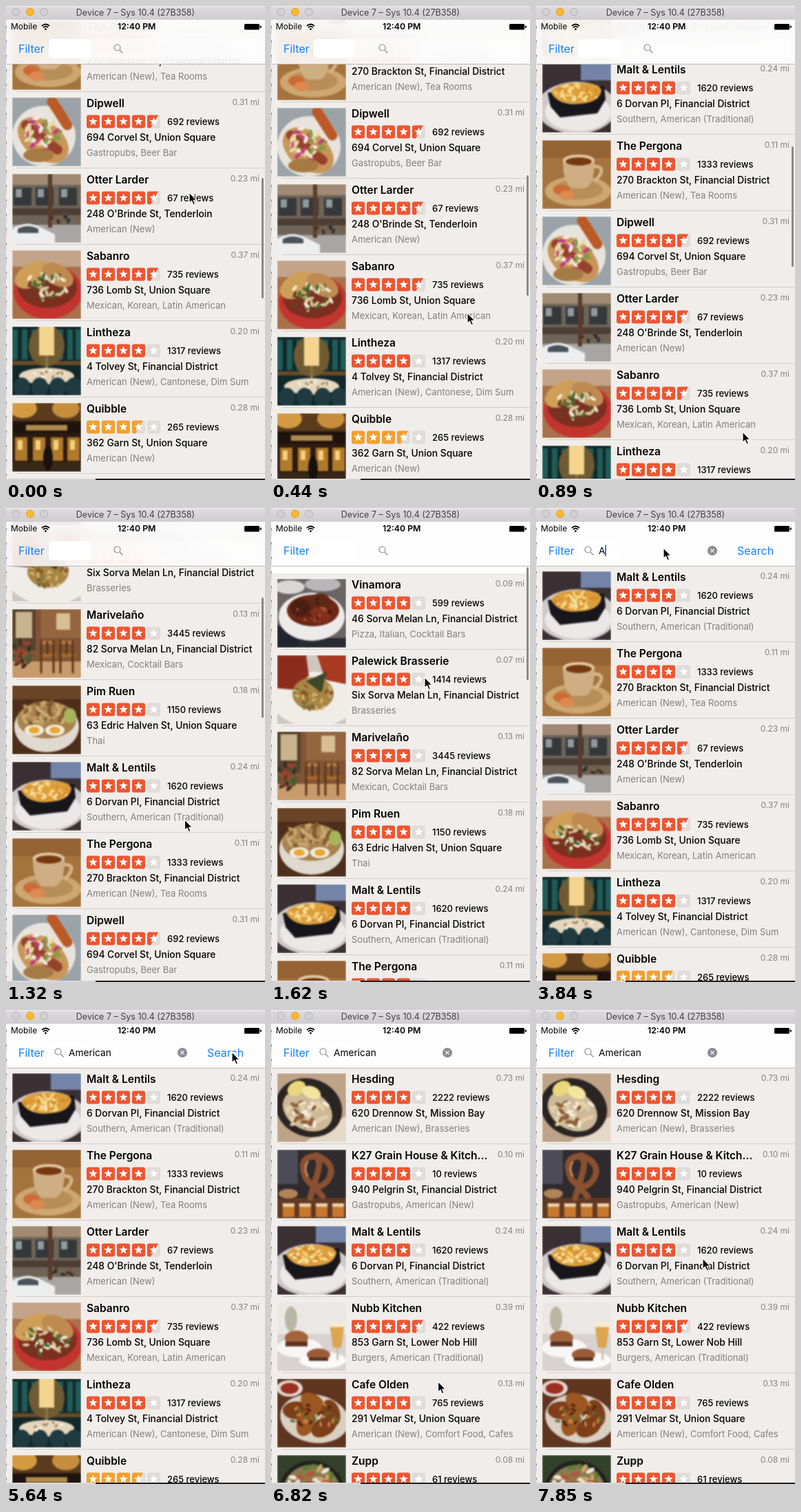
An HTML page that plays this animation: 376 by 689 pixels, repeating every 8 s.

```html
<!DOCTYPE html>
<html lang="en">
<head>
<meta charset="utf-8">
<title>Restaurant list</title>
<style>
html, body { margin: 0; width: 100%; height: 100%; overflow: hidden; }
body { position: relative; background: #d9d6da; font-family: Inter, "Noto Sans", sans-serif; color: #000; }
div, svg, b, span { position: absolute; white-space: nowrap; line-height: 20px; }
#bar { left: 0; top: 0; width: 376px; height: 20px; background: linear-gradient(#eeeaf0 1px, #dddadd 2px, #cfcdcf); }
#bar span { width: 376px; text-align: center; font-size: 12.5px; color: #404040; }
#bar svg, #cursor { left: 0; top: 0; }
#edge { left: 0; top: 20px; width: 1px; height: 669px; background: repeating-linear-gradient(#f2eff4 0 9px, #77747f 9px 12px, #d5d2da 12px 21px); }
#foot { left: 130px; top: 687px; width: 246px; height: 2px; background: #2b2026; }
#screen { left: 1px; top: 20px; width: 375px; height: 667px; overflow: hidden; background: #fff; }
.list { left: 0; top: 64px; width: 375px; background: #f0edea; }
.row { left: 0; width: 375px; height: 111px; }
.row::after { content: ""; position: absolute; left: 15px; right: 0; bottom: 0; height: 1px; background: #d0cdca; }
.thumb { left: 8px; top: 8px; width: 100px; height: 100px; overflow: hidden; }
.thumb svg { filter: blur(1px); }
.row > b, .row > span { left: 116px; }
.row > b { top: 7px; font-size: 15.5px; font-weight: 600; }
.row > .far { top: 5px; left: auto; right: 8px; font-size: 12px; color: #85827f; }
.row > svg { left: 116px; top: 33px; }
.row > .count { left: 233px; top: 33px; font-size: 13px; font-weight: 500; }
.row > .street { top: 56px; font-size: 13.8px; font-weight: 500; }
.row > .kind { top: 78px; font-size: 13px; color: #827f7c; }
#thumbBar { left: 370px; width: 3px; border-radius: 2px; background: #8b8886; }
#nav { left: 0; top: 0; width: 375px; height: 64px; background: rgba(253,253,253,.88); backdrop-filter: blur(14px); border-bottom: 1px solid #bab8b6; }
#field { left: 61px; top: 28px; width: 306px; height: 28px; border-radius: 5px; background: linear-gradient(90deg, #fff 60px, rgba(255,255,255,.35) 61px); }
#nav .link { top: 32px; font-size: 16px; color: #1482ff; }
#typed { left: 90px; top: 32px; font-size: 13.7px; }
#caret { top: 34px; width: 2px; height: 16px; background: #4070f2; }
</style>
</head>
<body>
<div id="screen">
  <div id="lists"></div>
  <div id="thumbBar"></div>
  <div id="nav">
    <span style="left:6px;font-size:12px">Mobile</span>
    <svg style="left:50px;top:5px" width="14" height="11" fill="none" stroke="#000" stroke-width="1.7">
      <path d="M1 4Q6.5-1 12 4M3 6.4Q6.5 3 10 6.4"/><circle cx="6.5" cy="8.6" r="1" fill="#000" stroke-width="1"/>
    </svg>
    <b style="left:161px;font-size:12.3px;font-weight:600">12:40 PM</b>
    <svg style="left:345px;top:5px" width="27" height="11"><rect y="1" width="22" height="8.5" rx="1.5"/><rect x="22.8" y="3.5" width="2" height="3.5" rx="1"/></svg>
    <div id="field"></div>
    <span class="link" style="left:17px">Filter</span>
    <svg id="lens" style="left:-7px;top:35px" width="14" height="14" fill="none" stroke="#8b8b90" stroke-width="1.2"><circle cx="5.5" cy="5.5" r="4.5"/><path d="M9 9l4.5 4.5"/></svg>
    <span id="typed"></span>
    <div id="caret"></div>
    <svg id="clear" style="left:247px;top:34px" width="16" height="16"><circle cx="8" cy="8" r="7" fill="#8b8b90"/><path d="M5.4 5.4l5.2 5.2m0-5.2l-5.2 5.2" stroke="#fff" stroke-width="1.3"/></svg>
    <span id="search" class="link" style="left:291px">Search</span>
  </div>
</div>
<div id="bar">
  <svg width="70" height="20" fill="#d2d0d2" stroke="#b4b1b4"><circle cx="14.5" cy="8.5" r="5.5"/><circle cx="35" cy="8.5" r="5.5" fill="#fdb92c" stroke="#dd9d25"/><circle cx="55" cy="8.5" r="5.5"/></svg>
  <span>Device 7 – Sys 10.4 (27B358)</span>
</div>
<div id="edge"></div>
<div id="foot"></div>
<svg id="cursor" width="14" height="21" overflow="visible"><path d="M0 0V15.5L3.5 12.3L6 18L8.6 16.9L6.2 11.3H11Z" stroke="#fff" stroke-width="1.2"/></svg>

<script>
const $ = id => document.getElementById(id);

// Thumbnail drawing helpers, on a 100 x 100 square
let seed = 11;
const rnd = () => (seed = seed * 16807 % 2147483647) / 2147483647;
const oval = (x, y, rx, ry, c, turn = 0) =>
  `<ellipse cx="${x}" cy="${y}" rx="${rx}" ry="${ry}" fill="${c}" transform="rotate(${turn} ${x} ${y})"/>`;
const box = (x, y, w, h, c) => `<rect x="${x}" y="${y}" width="${w}" height="${h}" fill="${c}"/>`;
const area = (d, c) => `<path d="${d}" fill="${c}"/>`;
const line = (d, c, w) => `<path d="${d}" fill="none" stroke="${c}" stroke-width="${w}" stroke-linecap="round"/>`;
const fill = c => box(0, 0, 100, 100, c);
const bits = (n, x, y, rx, ry, size, ...colors) => Array.from({ length: n }, (_, i) => {
  const a = rnd() * 6.283, d = Math.sqrt(rnd());
  return oval(x + rx * d * Math.cos(a), y + ry * d * Math.sin(a), size, size * .45, colors[i % colors.length], rnd() * 180);
}).join('');

const pics = {
  meatballs: () => fill('#6b6465') + oval(18, 12, 22, 10, '#d9d6d6') + oval(66, 8, 26, 10, '#b9b6ba') + area('M0 66L46 100H0Z', '#20242e')
    + box(30, 86, 70, 14, '#2a2a31') + oval(50, 55, 48, 35, '#edebea') + oval(52, 46, 38, 23, '#6e2716')
    + oval(34, 42, 15, 13, '#4b2013') + oval(62, 34, 16, 13, '#5f2817') + oval(62, 53, 17, 12, '#80301a') + bits(16, 50, 45, 30, 17, 3, '#b0563a', '#33160e'),
  plate: () => fill('#cfc6bd') + oval(54, 64, 62, 40, '#f0ece7') + area('M0 0H42L46 30L22 50L0 48Z', '#8c2d1c') + area('M58 0H100V42L70 36Z', '#a83a22')
    + oval(52, 56, 30, 24, '#a98546') + bits(34, 52, 58, 27, 22, 4, '#d3b56c', '#87562a', '#727338') + area('M42 38L72 24L64 54Z', '#3c472b'),
  patio: () => fill('#805434') + box(0, 0, 34, 60, '#58432f') + box(5, 4, 24, 38, '#c9b48f') + box(42, 0, 58, 42, '#94653f') + box(64, 6, 20, 24, '#d8bf94')
    + box(0, 76, 100, 24, '#c99a6b') + bits(26, 14, 66, 15, 20, 5, '#4a5a32', '#a3402e', '#33301f')
    + [40, 68].map(x => box(x, 46, 22, 5, '#b47a42') + box(x, 64, 24, 6, '#a5682f') + line(`M${x + 2} 46V92M${x + 20} 46V92M${x + 11} 48V64`, '#5c351a', 3)).join(''),
  noodles: () => fill('#4e2e1a') + box(0, 0, 100, 20, '#6a4427') + oval(50, 60, 47, 37, '#dfd9cf') + oval(50, 50, 43, 27, '#a8834e')
    + bits(54, 48, 42, 37, 18, 5, '#cdae76', '#7d5a30', '#bd9a5e') + oval(84, 44, 9, 11, '#a9b45a')
    + [32, 62].map(x => oval(x, 65, 14, 8, '#f2ede3') + oval(x, 65, 8, 5, '#e9a732')).join(''),
  gratin: () => fill('#3a2f33') + box(56, 0, 44, 24, '#7484a8') + oval(50, 64, 58, 38, '#cfc9ca') + oval(52, 70, 48, 28, '#ece8e8')
    + area('M8 42L90 32L92 52L80 72L26 78L12 62Z', '#17161b') + area('M13 42Q20 28 48 28Q80 26 86 38Q84 56 56 58Q24 62 13 42Z', '#dd9f3c')
    + bits(40, 50, 42, 31, 12, 4, '#f5d57e', '#d98c28', '#f8e5ac'),
  tea: () => fill('#a5733d') + box(0, 0, 100, 26, '#956233') + oval(52, 74, 48, 22, '#cda671') + oval(52, 72, 36, 14, '#b88e58')
    + line('M74 38Q96 38 78 58', '#d4b48a', 5) + area('M30 28H76Q76 66 62 70H44Q30 64 30 28Z', '#cfae83')
    + oval(53, 29, 23, 8, '#e4caa4') + oval(53, 31, 19, 6, '#74390f') + oval(28, 72, 12, 7, '#cf6a36') + oval(36, 80, 11, 7, '#dd8a50'),
  hotdog: () => fill('#9ba3a8') + oval(46, 56, 46, 44, '#e8e4dd') + oval(45, 62, 42, 27, '#c8965a', 38) + line('M58 6L80 40', '#bb5a26', 15)
    + line('M20 40L66 76', '#96422a', 14) + bits(36, 44, 52, 24, 26, 6, '#f2ede0', '#c0407a', '#ead9a8', '#8a9a44') + oval(38, 84, 22, 10, '#a57a44'),
  corner: () => fill('#6f6458') + box(0, 0, 100, 16, '#a08a74') + [2, 34, 68].map(x => box(x, 20, 26, 26, '#34383a') + box(x + 3, 22, 9, 12, '#8f9a9c')).join('')
    + box(0, 50, 100, 10, '#4c3e35') + box(0, 74, 100, 26, '#a9a5a2') + box(52, 0, 6, 78, '#5a3c2c') + bits(10, 76, 66, 20, 6, 4, '#2c2b2d', '#7a5a3c')
    + area('M0 80Q20 66 42 78L62 88V100H0Z', '#eceef0') + area('M8 80Q22 72 38 80V86H8Z', '#4a525a'),
  tacos: () => fill('#a9714a') + box(0, 0, 100, 24, '#c3a48a') + oval(52, 60, 50, 40, '#c4342f') + oval(51, 54, 43, 30, '#7c2f20')
    + oval(30, 36, 28, 17, '#cf9f58', -28) + oval(66, 36, 25, 15, '#be8a50', 30) + bits(44, 50, 54, 34, 21, 5, '#4a6a32', '#f1ead8', '#6e3a20', '#d3c99a'),
  lounge: () => fill('#12282a') + [0, 14, 28, 66, 80, 92].map(x => box(x, 4, 8, 44, '#1f5c58')).join('') + box(0, 50, 100, 6, '#6a4a26')
    + oval(50, 28, 26, 30, '#6f5a32') + box(39, 0, 22, 42, '#f3d590') + box(48, 42, 4, 26, '#8c6f3f') + oval(50, 72, 40, 12, '#e5d6bd')
    + [14, 40, 66, 90].map(x => oval(x, 88, 12, 14, '#1f3a40')).join('') + bits(10, 50, 70, 28, 6, 3, '#fff6df', '#9a7b52'),
  facade: () => fill('#2c1b10') + box(0, 0, 100, 26, '#5b3b1c') + oval(16, 8, 20, 14, '#d39a42') + oval(78, 8, 20, 14, '#c68e3c') + box(0, 28, 100, 16, '#1e130d')
    + box(20, 32, 60, 8, '#b08a4c') + [4, 30, 56, 80].map(x => box(x, 50, 18, 34, '#b07a2c') + box(x + 4, 54, 7, 14, '#f4d27c')).join('')
    + box(0, 86, 100, 14, '#3a2817') + oval(52, 80, 7, 18, '#18100c'),
  fish: () => fill('#bfa389') + area('M40 100L100 62V100Z', '#e6d8c6') + oval(46, 50, 49, 42, '#2a2422', 20) + oval(44, 54, 38, 28, '#cdb999', 28)
    + bits(36, 44, 56, 31, 23, 6, '#f3eadb', '#8f5f36', '#e3d1a8') + oval(28, 22, 14, 10, '#ead77c', -30) + oval(50, 28, 14, 9, '#f3e4a0', 24),
  pretzel: () => fill('#2e2a2d') + box(0, 0, 30, 50, '#4b4c56') + box(0, 70, 100, 30, '#5f3a22') + line('M56 8Q88 20 74 44Q58 64 42 42Q30 14 50 10Q66 8 58 36L48 70M42 42L66 68', '#8a5030', 9)
    + line('M44 18Q38 28 44 38', '#c08a5a', 3) + [8, 32, 56, 80].map(x => box(x, 78, 17, 20, '#c8772e') + box(x, 78, 17, 5, '#ead3ae')).join('') + oval(16, 64, 14, 7, '#b08458'),
  burger: () => fill('#d8d3d0') + box(0, 0, 100, 46, '#eae7e5') + oval(20, 24, 9, 18, '#b9b6a4') + oval(32, 66, 33, 14, '#f8f6f4') + oval(66, 84, 34, 12, '#fbfaf9')
    + oval(28, 52, 17, 11, '#a3643a') + box(12, 57, 32, 7, '#5c3220') + oval(60, 76, 17, 9, '#9a5c38') + box(46, 80, 28, 5, '#59301c')
    + area('M76 30H98L93 66H81Z', '#dba650') + box(76, 28, 22, 8, '#f6ead2') + box(86, 66, 3, 18, '#c8c0b6'),
  wings: () => fill('#5f3520') + oval(18, 14, 19, 12, '#e2d8cf') + oval(18, 14, 13, 8, '#9a2f22') + oval(54, 58, 50, 35, '#d9cfc3', 10)
    + [[28, 46], [52, 36], [78, 50], [42, 64], [68, 70]].map(([x, y], i) => oval(x, y, 20, 13, i % 2 ? '#9c5622' : '#7d3f1a', i * 37)).join('') + bits(26, 54, 54, 34, 22, 4, '#cb8540', '#4f2712', '#5d6e34'),
  salad: () => fill('#33402a') + oval(50, 56, 48, 48, '#20211e') + oval(50, 54, 42, 40, '#8a7a4e') + bits(60, 50, 50, 40, 36, 7, '#f0e6d8', '#5d7c35', '#b4543a', '#c9a468')
};

// name | distance | stars | reviews | address | kind | picture
const places = `Vinamora|0.09|4|599|46 Sorva Melan Ln, Financial District|Pizza, Italian, Cocktail Bars|meatballs
Palewick Brasserie|0.07|4|1414|Six Sorva Melan Ln, Financial District|Brasseries|plate
Marivelaño|0.13|4|3445|82 Sorva Melan Ln, Financial District|Mexican, Cocktail Bars|patio
Pim Ruen|0.18|4|1150|63 Edric Halven St, Union Square|Thai|noodles
Malt & Lentils|0.24|4|1620|6 Dorvan Pl, Financial District|Southern, American (Traditional)|gratin
The Pergona|0.11|4|1333|270 Brackton St, Financial District|American (New), Tea Rooms|tea
Dipwell|0.31|4.5|692|694 Corvel St, Union Square|Gastropubs, Beer Bar|hotdog
Otter Larder|0.23|4.5|67|248 O'Brinde St, Tenderloin|American (New)|corner
Sabanro|0.37|4.5|735|736 Lomb St, Union Square|Mexican, Korean, Latin American|tacos
Lintheza|0.20|4|1317|4 Tolvey St, Financial District|American (New), Cantonese, Dim Sum|lounge
Quibble|0.28|3.5|265|362 Garn St, Union Square|American (New)|facade
Hesding|0.73|4|2222|620 Drennow St, Mission Bay|American (New), Brasseries|fish
K27 Grain House & Kitch...|0.10|4|10|940 Pelgrin St, Financial District|Gastropubs, American (New)|pretzel
Nubb Kitchen|0.39|4.5|422|853 Garn St, Lower Nob Hill|Burgers, American (Traditional)|burger
Cafe Olden|0.13|4|765|291 Velmar St, Union Square|American (New), Comfort Food, Cafes|wings
Zupp|0.08|4|61|518 Tarrow St, Financial District|Salad, Sandwiches|salad`.split('\n').map(s => s.split('|'));

const starPoints = Array.from({ length: 10 }, (_, i) => {
  const a = i * Math.PI / 5, d = i % 2 ? 2.8 : 6.6;
  return `${9.5 + d * Math.sin(a)},${10 - d * Math.cos(a)}`;
}).join(' ');

function stars(score) {
  const color = score < 4 ? '#f3a02f' : '#ee5530';
  const tile = c => `<rect y=".5" width="19" height="19" rx="3" fill="${c}"/>`;
  const half = area('M0 3Q0 .5 3 .5H16L5 19.5H3Q0 19.5 0 17Z', color);
  return '<svg width="110" height="20">' + [0, 1, 2, 3, 4].map(i => {
    const part = score - i;
    return `<g transform="translate(${i * 22})">${tile(part >= 1 ? color : '#dfdcda')}${part === .5 ? half : ''}
      <polygon points="${starPoints}" fill="#fff"/></g>`;
  }).join('') + '</svg>';
}

function row([name, far, score, count, street, kind, pic], i) {
  return `<div class="row" style="top:${i * 111}px">
    <div class="thumb"><svg width="100" height="100">${pics[pic]()}</svg></div>
    <b>${name}</b><span class="far">${far} mi</span>${stars(+score)}<span class="count">${count} reviews</span>
    <span class="street">${street}</span><span class="kind">${kind}</span></div>`;
}

const orders = [[0, 1, 2, 3, 4, 5, 6, 7, 8, 9, 10], [4, 5, 7, 8, 9, 10], [11, 12, 4, 13, 14, 15]];
$('lists').innerHTML = orders.map(order =>
  `<div class="list" style="height:${order.length * 111 + 300}px">${order.map((n, i) => row(places[n], i)).join('')}</div>`).join('');
const lists = [...document.querySelectorAll('.list')];

// Keys are [tick, value, ...]; values between them are interpolated
function track(keys, k) {
  const next = keys.findIndex(key => key[0] > k);
  if (next < 0) return keys[keys.length - 1].slice(1);
  if (next === 0) return keys[0].slice(1);
  const [a, b] = [keys[next - 1], keys[next]], u = (k - a[0]) / (b[0] - a[0]);
  return a.slice(1).map((v, i) => v + (b[i + 1] - v) * u);
}

const LOOP = 8000, TICK = 147.9;
const pointer = [[0, 266, 271], [3, 285, 446], [6, 300, 619], [7, 296, 660], [11, 223, 246], [16, 198, 38], [17, 185, 58], [35, 185, 58],
  [38, 328, 61], [40, 328, 61], [43, 250, 600], [47, 240, 520], [51, 241, 491], [53, 242, 361]];
const scrolling = [[0, 625], [3, 610], [6, 452], [7, 395], [8, 290], [10, 45], [11, -11], [13, -4], [15, 0]];
const barFade = [[13, 1], [16, 0]];
const lensMove = [[19, 162], [20, 128], [21, 85], [22, 76]];
const searchShow = [[19, 0, 35], [20, .4, 25], [21, .8, 6], [22, 1, 0], [39, 1, 0], [41, 0, 0]];
const keyTicks = [26, 27, 28, 30, 31, 32, 32, 33];

function draw(now) {
  const k = Math.floor((now % LOOP + 15) / TICK);
  const [x, y] = track(pointer, k), [scroll] = track(scrolling, k);
  $('cursor').style.transform = `translate(${x}px,${y}px)`;

  const shown = k < 26 ? 0 : k < 46 ? 1 : 2;
  lists.forEach((list, i) => {
    list.style.display = i === shown ? 'block' : 'none';
    list.style.transform = `translateY(${Math.round(-scroll)}px)`;
  });

  const bar = $('thumbBar').style;
  bar.top = 66 + Math.max(0, scroll) * .262 + 'px';
  bar.height = 175 + Math.min(0, scroll) + 'px';
  bar.opacity = track(barFade, k)[0];

  $('lens').style.transform = `translateX(${track(lensMove, k)[0]}px)`;
  const [alpha, shift] = track(searchShow, k);
  $('search').style.opacity = alpha;
  $('search').style.transform = `translateX(${shift}px)`;

  $('typed').textContent = 'American'.slice(0, keyTicks.filter(tick => tick <= k).length);
  $('caret').style.left = 90 + $('typed').offsetWidth + 'px';
  $('caret').style.display = k >= 21 && k < 33 ? 'block' : 'none';
  $('clear').style.display = k >= 26 ? 'block' : 'none';
}

const start = performance.now();
(function loop() {
  draw(performance.now() - start);
  requestAnimationFrame(loop);
})();
</script>
</body>
</html>
```
